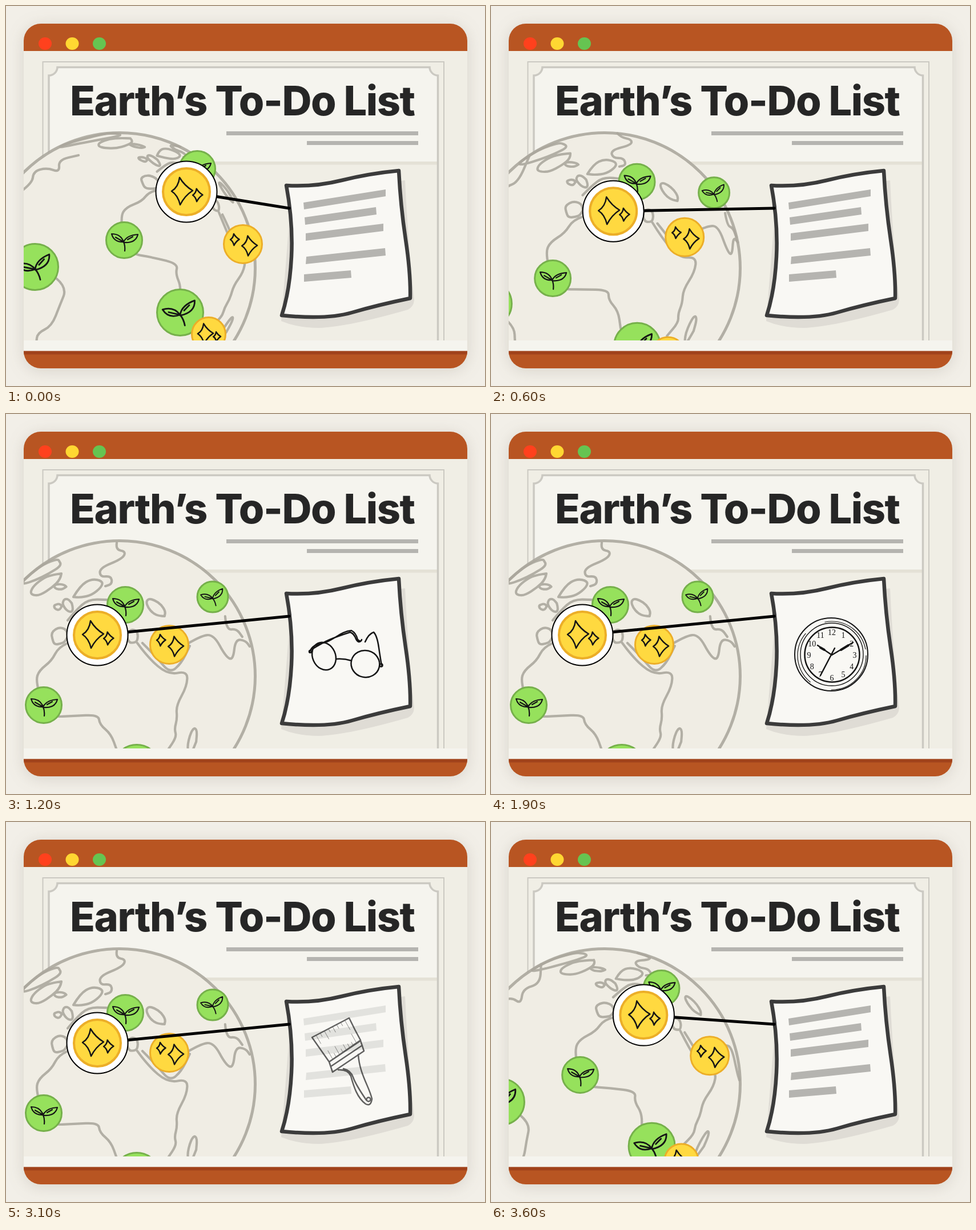
These frames come from a looping animation (839x667 px, 3700 ms). An HTML page:

```html
<!DOCTYPE html>
<html lang="en">
<head>
<meta charset="utf-8">
<title>Earth’s To-Do List</title>
<style>
  html, body { margin: 0; width: 100%; height: 100%; overflow: hidden; background: #f2efe8; }
  svg { display: block; width: 839px; height: 667px; }
  .window { filter: drop-shadow(0 4px 14px rgba(90, 80, 60, .17)); }
  .title { font: 800 72px Inter, "Liberation Sans", sans-serif; letter-spacing: -.02em; fill: #262626; }
  .digits { font: 14px "Liberation Serif", "Noto Serif", serif; fill: #151515; stroke: none; text-anchor: middle; }
  .ink { fill: none; stroke: #151515; stroke-width: 2.5; stroke-linecap: round; stroke-linejoin: round; }
  .ink use, .ink .thin { vector-effect: non-scaling-stroke; }
  .land { fill: none; stroke: #aaa79c; stroke-opacity: .88; stroke-width: 4.2; stroke-linecap: round; stroke-linejoin: round; }
  .bar { fill: #b5b4b0; }
</style>
</head>
<body>
<svg viewBox="0 0 839 667">
  <defs>
    <clipPath id="page"><rect x="31" y="79" width="777" height="508"/></clipPath>
    <clipPath id="frame"><rect x="31" y="31" width="777" height="605" rx="30"/></clipPath>
    <path id="star" vector-effect="non-scaling-stroke" d="M-5-24Q4-9 18-1Q4 8-4 24Q-8 7-19 0Q-7-7-5-24Z"/>
    <g id="sparkles" class="ink">
      <use href="#star" x="-7" y="-1"/>
      <use href="#star" transform="translate(20 6) scale(.47)"/>
    </g>
    <g id="twins" class="ink">
      <use href="#star" transform="translate(12 3) scale(.73)"/>
      <use href="#star" transform="translate(-14 -8) scale(.42)"/>
    </g>
    <path id="sprout" class="ink" style="stroke-width:2.2"
      d="M1 19Q2 10-1 3Q-6-11-22-11Q-18 4-1 3M-15-5Q-8-1-1 3Q5-9 24-10Q20 6-1 4M15-6L6-1"/>
  </defs>

  <rect class="window" x="31" y="31" width="777" height="605" rx="30" fill="#b85522"/>
  <g clip-path="url(#frame)">
    <path fill="#f0eee5" d="M31 79H808V587H31Z"/>
    <path fill="#f5f4ee" d="M31 587H808V606H31Z"/>
    <path fill="#a0421b" d="M31 605.500H808V611.500H31Z"/>
    <ellipse cx="68.500" cy="66" rx="11.500" ry="11" fill="#ff411d"/>
    <ellipse cx="116" cy="66" rx="11.500" ry="11" fill="#ffd732"/>
    <ellipse cx="163.500" cy="66" rx="11.500" ry="11" fill="#66c451"/>
  </g>

  <g clip-path="url(#page)">
    <path fill="#f5f4ee" d="M75 273V123A15 15 0 0 0 90 108H742A15 15 0 0 0 757 123V273Z"/>
    <path fill="#e4e1d6" d="M76 273H756V278.500H76Z"/>
    <path fill="none" stroke="#cbc9c2" stroke-width="2" d="M64.500 600V98H767V600"/>
    <path fill="none" stroke="#cbc9c2" stroke-width="3.500" d="M75 600V122A15 15 0 0 0 90 107.500H742A15 15 0 0 0 756.500 122V600"/>
    <text class="title" x="112" y="192">Earth’s To-Do List</text>
    <path class="bar" d="M386 220H722V227H386ZM527 237H722V244H527Z"/>

    <circle class="land" cx="199" cy="460" r="237.500" style="fill:#f0ede4;stroke-width:5"/>
    <path id="land" class="land"/>
    <g id="badges"></g>

    <path fill="#dfdcd5" d="M500 330L699 306Q705 430 715 516Q714 528 704 533Q600 563 548 565Q510 565 482 553Z"/>
    <path fill="#f9f8f4" stroke="#3b3b3b" stroke-width="6.500" stroke-linejoin="round"
      d="M491 315Q540 318 588 306T688 289Q691 350 700 410T708 513Q650 525 606 538T483 543Q497 500 500 440T491 315Z"/>
    <g id="list" class="bar">
      <path d="M521 345L665 322V334L522 357ZM523 371L648 353L649 366L524 384ZM525 399L661 382V395L525 412ZM526 440L664 425L665 438L525 453ZM522 471L604 464L605 477L522 484Z"/>
    </g>
    <g id="glasses" class="ink">
      <ellipse cx="557" cy="425" rx="20" ry="25" transform="rotate(-24 557 425)"/>
      <ellipse cx="629.500" cy="438.500" rx="25" ry="23.500" transform="rotate(14 629 438)"/>
      <path d="M579 430Q592 429 605 433M532 417C538 402 550 405 564 399S589 381 605 380Q613 384 616 396Q622 401 623 396M536 413Q553 402 567 396T603 383Q610 386 613 395Q617 403 622 398M629 400Q635 386 644 383Q650 389 653 410T658 441"/>
      <circle cx="533" cy="417" r="2"/><circle cx="657" cy="441" r="2.500"/>
    </g>
    <g id="clock" class="ink">
      <circle cx="596" cy="422" r="64" stroke-width="2"/>
      <circle cx="597" cy="424" r="60" style="stroke-width:1.200" stroke-dasharray="95 40"/>
      <circle cx="597" cy="422" r="55" style="stroke-width:1.400"/>
      <circle cx="597.500" cy="422.500" r="48"/>
      <path d="M577 459L602 411M572 406L597 423L634 401"/>
      <path style="stroke-width:4" d="M584 414L577 410M613 414L626 406"/>
    </g>
    <g id="brush" class="ink">
      <path d="M536 378Q567 362 601 344Q611 365 621 383L566 421Q552 401 536 378ZM566 421L621 384L627 402L572 439ZM569 429L624 392"/>
      <path d="M582 435Q599 434 604 446C609 464 615 484 630 495Q639 500 641 486C637 466 619 442 617 408M591 433Q604 436 608 448T631 488"/>
      <circle cx="635" cy="487" r="3.500"/>
      <path id="bristles" style="stroke-width:1" stroke-opacity=".7"/>
    </g>
    <path id="string" stroke="#000" stroke-width="5" stroke-linecap="round"/>
    <g id="coin">
      <circle r="53.500" fill="#fff" stroke="#000" stroke-width="2"/>
      <circle r="41" fill="#ffd940" stroke="#ecae28" stroke-width="4"/>
      <use href="#sparkles"/>
    </g>
  </g>
</svg>

<script>
const LOOP = 3700, STEP = 100, POSES = 3;
const CENTER = [199, 460], RADIUS = 238;
const AXIS = [-.466, .812, -.349], TURN = Math.PI / 4;
const $ = id => document.getElementById(id);

let seed = 7;
const random = () => (seed = seed * 16807 % 2147483647) / 2147483647;

function add(parent, tag, attrs) {
  const node = document.createElementNS('http://www.w3.org/2000/svg', tag);
  for (const key in attrs) node.setAttribute(key, attrs[key]);
  return parent.appendChild(node);
}

// The globe as a sphere: screen point to unit vector and back. side -1 is the far half.
function lift([px, py, side = 1]) {
  const x = (px - CENTER[0]) / RADIUS, y = (CENTER[1] - py) / RADIUS;
  const v = [x, y, side * Math.sqrt(Math.max(0, 1 - x * x - y * y))];
  const length = Math.hypot(...v);
  return v.map(n => n / length);
}
const flatten = ([x, y]) => [CENTER[0] + x * RADIUS, CENTER[1] - y * RADIUS];
const dot = (a, b) => a[0] * b[0] + a[1] * b[1] + a[2] * b[2];

function turn(v, angle) {
  const [a, b, c] = AXIS, cos = Math.cos(angle), sin = Math.sin(angle);
  const cross = [b * v[2] - c * v[1], c * v[0] - a * v[2], a * v[1] - b * v[0]];
  const along = dot(AXIS, v) * (1 - cos);
  return v.map((n, i) => n * cos + cross[i] * sin + AXIS[i] * along);
}

function slerp(from, to, k) {
  const angle = Math.acos(dot(from, to)), sin = Math.sin(angle);
  const p = Math.sin((1 - k) * angle) / sin, q = Math.sin(k * angle) / sin;
  return from.map((n, i) => n * p + to[i] * q);
}

// Smooth stroke through the midpoints of its corners.
function smooth(pts) {
  if (pts.length < 2) return '';
  let d = `M${pts[0]}`;
  for (let i = 1; i < pts.length - 1; i++) {
    const [a, b] = [pts[i], pts[i + 1]];
    d += `Q${a} ${(a[0] + b[0]) / 2},${(a[1] + b[1]) / 2}`;
  }
  return d + `L${pts[pts.length - 1]}`;
}

// An uneven closed shoreline.
function ring(cx, cy, rx, ry, tilt = 0, corners = 9) {
  const cos = Math.cos(tilt), sin = Math.sin(tilt);
  const pts = Array.from({ length: corners }, (_, i) => {
    const a = i / corners * 2 * Math.PI, wobble = .9 + random() * .35;
    const x = rx * wobble * Math.cos(a), y = ry * wobble * Math.sin(a);
    return [cx + x * cos - y * sin, cy + x * sin + y * cos];
  });
  return [...pts, pts[0]];
}
const line = text => text.split(' ').map(p => p.split(',').map(Number));

// Key points of the coasts, where they face the viewer at either end of the turn.
const facingFirst = [
  line('20,330 46,312 48,290 72,284 94,292 92,270 127,262 108,240'),
  line('88,478 107,494 94,526 80,562 55,574 53,592')
];
const europe = [
  line('194,226 192,238 210,241 204,254 164,270 165,286 184,284 186,298 174,302'),
  line('118,321 130,301 150,289 169,293 168,303 150,318 130,322 118,321'),
  line('108,362 122,345 144,325 178,326'),
  ring(64, 276, 38, 9, -.5), ring(69, 299, 31, 10, -.6), ring(94, 303, 10, 4),
  ring(108, 335, 7, 12, -.4), ring(91, 338, 6, 5), ring(93, 390, 14, 14),
  ring(262, 340, 20, 10, .75), ring(222, 390, 9, 11)
];
const africa = [
  line('108,402 92,409 80,433 58,450 52,468 64,510 80,532 118,530 162,528 164,545 184,562 194,590'),
  line('230,402 248,427 284,458 318,451 317,478 298,512 300,535 295,553 299,567 282,592'),
  ring(326, 574, 6, 23, .2)
];
const asia = [
  line('239,402 264,427 287,455 307,438 322,407'),
  line('310,408 341,389 364,387 385,426 398,432 402,395 420,398 427,408'),
  line('384,355 386,379 404,377 414,391')
];
const coasts = [
  ...facingFirst.map(pts => pts.map(lift)),
  ...[...europe, ...africa, ...asia].map(pts => pts.map(p => turn(lift(p), TURN)))
];

// Badges travel along great circles between two places.
const badges = [
  { kind: 'sprout', r: 33, from: [335, 286], to: [209, 335] },
  { kind: 'sprout', r: 28.5, tilt: -17, from: [408, 367, -1], to: [362, 321] },
  { kind: 'sprout', r: 33, from: [207, 411], to: [66, 511] },
  { kind: 'sprout', r: 42, tilt: -19, from: [51, 458], to: [-14, 550] },
  { kind: 'sprout', r: 42, tilt: -17, from: [305, 538], to: [229, 621] },
  { kind: 'twins', r: 35, from: [415, 418], to: [286, 405] },
  { kind: 'sparkles', r: 31, from: [355, 576], to: [285, 625] }
];
const coin = { node: $('coin'), from: [316, 326], to: [160, 388] };
const looks = {
  sprout: { fill: '#96e15c', stroke: '#76b04b', size: 33 },
  sparkles: { fill: '#ffd940', stroke: '#ecae28', size: 42 },
  twins: { fill: '#ffd940', stroke: '#ecae28', size: 35 }
};

for (const badge of badges) {
  const { kind, r, tilt = 0 } = badge, { fill, stroke, size } = looks[kind];
  badge.node = add($('badges'), 'g', {});
  add(badge.node, 'circle', { r: r - 1.5, 'stroke-width': 3, fill, stroke });
  add(badge.node, 'use', { href: '#' + kind, transform: `rotate(${tilt}) scale(${r / size})` });
}

for (let hour = 1; hour <= 12; hour++) {
  const angle = hour * Math.PI / 6;
  add($('clock'), 'text', {
    class: 'digits', x: 597 + 40 * Math.sin(angle), y: 427.5 - 40 * Math.cos(angle)
  }).textContent = hour;
}

let hatch = '';
for (let i = 1; i < 9; i++) {
  const length = 6 + random() * 14;
  hatch += `M${536 + i * 7.2} ${378 - i * 3.7}l${length * .45} ${length * .8}`;
  hatch += `M${566 + i * 6} ${420 - i * 4}l${-length * .45} ${-length * .8}`;
}
$('bristles').setAttribute('d', hatch);

function move({ node, from, to }, k) {
  const v = slerp(lift(from), lift(to), k), [x, y] = flatten(v);
  node.setAttribute('visibility', v[2] < 0 ? 'hidden' : 'visible');
  node.setAttribute('transform', `translate(${x},${y})`);
  return [x, y];
}

function place(k) {
  const visible = coasts.map(pts => pts.map(v => turn(v, -k * TURN)).filter(v => v[2] > 0).map(flatten));
  $('land').setAttribute('d', visible.map(smooth).join(''));
  badges.forEach(badge => move(badge, k));
  $('string').setAttribute('d', `M${move(coin, k)}L496 355`);
}

// Progress, in three equal steps, of a change that begins at the given time.
const progress = (t, start) =>
  Math.min(POSES, Math.max(0, Math.floor((t - start) / STEP) + 1)) / POSES;

function draw(t) {
  place(progress(t, 500) - progress(t, 3500));
  const [glasses, clock, brush, list] = [1000, 1700, 2400, 3100].map(start => progress(t, start));
  $('glasses').style.opacity = glasses - clock;
  $('clock').style.opacity = clock - brush;
  $('brush').style.opacity = brush - list;
  $('list').style.opacity = 1 - glasses + list;
}

let shown = -1;
function tick() {
  const t = performance.now() % LOOP, slot = Math.floor(t / STEP);
  if (slot !== shown) draw(t);
  shown = slot;
  requestAnimationFrame(tick);
}
tick();
</script>
</body>
</html>
```
